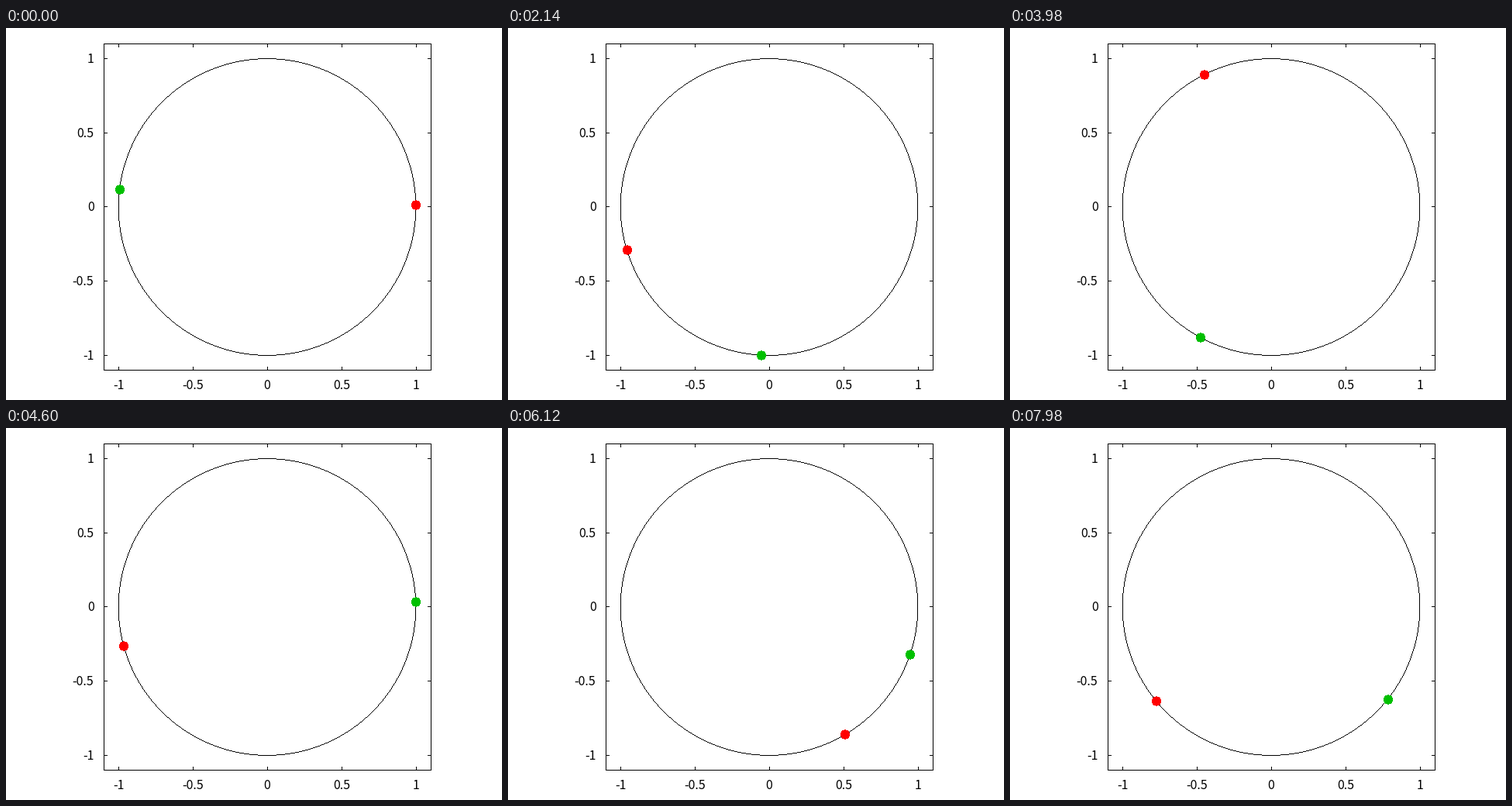
A matplotlib script that plays this animation: 640x480 px, repeating every 8000 ms.

```python
import numpy as np
import matplotlib.pyplot as plt
from matplotlib.animation import FuncAnimation
from matplotlib.collections import PolyCollection
from matplotlib.patches import Circle, Rectangle

W, H, DPI = 640, 480, 100
FRAMES, INTERVAL = 400, 20
LEFT, RIGHT, TOP, BOTTOM = 126, 548, 20, 441
CX, CY = (LEFT + RIGHT) / 2, (TOP + BOTTOM) / 2
SX, SY = (RIGHT - LEFT) / 2.2, (BOTTOM - TOP) / 2.2
PX = CX - 0.5  # plotted data truncates to the pixel on its left
TICK = 5

# Two coupled phase oscillators
OMEGA = np.array([1.0, 2.5])
COUPLING = np.array([0.8, 0.4])
DT, SUBSTEPS = 0.01, 3


def rate(theta):
    return OMEGA + COUPLING * np.sin(theta[::-1] - theta)


def rk4(theta):
    a = rate(theta)
    b = rate(theta + DT / 2 * a)
    c = rate(theta + DT / 2 * b)
    d = rate(theta + DT * c)
    return theta + DT / 6 * (a + 2 * b + 2 * c + d)


def solve():
    theta = rk4(np.array([0.0, 3.0]))
    path = []
    for _ in range(FRAMES):
        path.append(theta)
        for _ in range(SUBSTEPS):
            theta = rk4(theta)
    return path


phases = solve()

fig = plt.figure(figsize=(W / DPI, H / DPI), dpi=DPI, facecolor="white")
ax = fig.add_axes([0, 0, 1, 1])
ax.set_xlim(0, W)
ax.set_ylim(H, 0)
ax.axis("off")


def bar(x, y, w, h):
    ax.add_patch(Rectangle((x, y), w, h, fc="black", lw=0, antialiased=False))


def label(x, y, value, ha):
    ax.text(x, y, f"{value:g}", ha=ha, va="baseline", color="black",
            family="Noto Sans CJK JP", size=16 * 72 / DPI)


def draw_axes():
    width, height = RIGHT - LEFT + 1, BOTTOM - TOP + 1
    for y in (TOP, BOTTOM):
        bar(LEFT, y, width, 1)
    for x in (LEFT, RIGHT):
        bar(x, TOP, 1, height)
    for v in (-1, -0.5, 0, 0.5, 1):
        x, y = round(CX + SX * v), round(CY - SY * v)
        bar(x, TOP, 1, TICK)
        bar(x, BOTTOM - TICK + 1, 1, TICK)
        bar(LEFT, y, TICK, 1)
        bar(RIGHT - TICK + 1, y, TICK, 1)
        label(x, 466, v, "center")
        label(113.5, y + 6, v, "right")


def draw_circle():
    """One-pixel outline, stepped along the major direction of each arc."""
    cells = set()
    for x in range(int(PX - SX * 0.71), int(PX + SX * 0.71) + 1):
        dy = SY * np.sqrt(1 - ((x - PX) / SX) ** 2)
        cells |= {(x, round(CY - dy)), (x, round(CY + dy))}
    for y in range(int(CY - SY * 0.71), int(CY + SY * 0.71) + 1):
        dx = SX * np.sqrt(1 - ((y - CY) / SY) ** 2)
        cells |= {(round(PX - dx), y), (round(PX + dx), y)}
    squares = [[(x, y), (x + 1, y), (x + 1, y + 1), (x, y + 1)]
               for x, y in sorted(cells)]
    ax.add_collection(PolyCollection(squares, facecolors="black", linewidths=0,
                                     antialiaseds=False), autolim=False)


draw_axes()
draw_circle()
# Without antialiasing every touched pixel is filled, so the radius is small
dots = [ax.add_patch(Circle((0, 0), 5.55, fc=color, lw=0, antialiased=False,
                            zorder=5))
        for color in ("#ff0000", "#00c000")]


def update(i):
    for dot, angle in zip(dots, phases[i]):
        x = round(PX + SX * np.cos(angle)) + 1
        y = round(CY - SY * np.sin(angle)) + 0.5
        dot.center = (x, y)
    return dots


anim = FuncAnimation(fig, update, frames=FRAMES, interval=INTERVAL,
                     repeat=True, repeat_delay=0)
plt.show()
```
